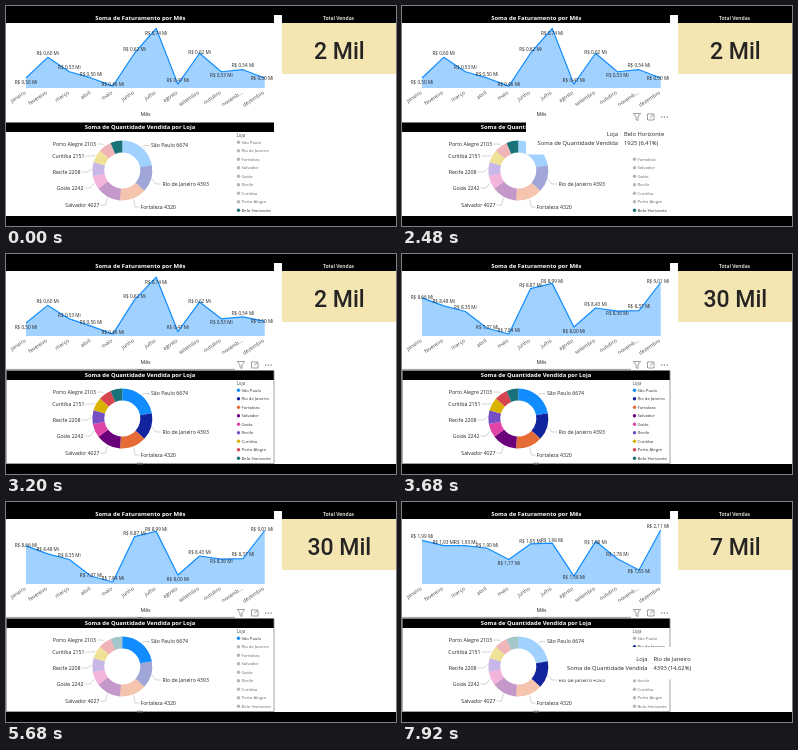
An HTML page with a canvas for the animation above (8000 ms loop, 390 px wide and 220 px high).

```html
<!DOCTYPE html>
<html lang="pt-BR">
<head>
<meta charset="utf-8">
<title>Painel de vendas</title>
<style>
  html, body { margin: 0; width: 100%; height: 100%; overflow: hidden; background: #000; }
  canvas { display: block; width: 390px; height: 220px; }
</style>
</head>
<body>
<canvas id="stage"></canvas>
<script>
const LOOP = 8000;
const canvas = document.getElementById('stage');
const ctx = canvas.getContext('2d');
const ratio = window.devicePixelRatio || 1;
canvas.width = 390 * ratio;
canvas.height = 220 * ratio;

const SANS = '"Open Sans", "Noto Sans", sans-serif';
const months = ['janeiro', 'fevereiro', 'março', 'abril', 'maio', 'junho', 'julho',
  'agosto', 'setembro', 'outubro', 'novemb...', 'dezembro'];

// Each series scales its values from its maximum; shift places the labels.
const series = [
  { total: '2 Mil', top: 22.5, scale: 206,
    values: [.50, .60, .53, .50, .46, .62, .74, .47, .62, .53, .54, .50],
    shift: [4, -4, -4, -4, -2, -4, 5, -4, -1, 4, -4, 0] },
  { total: '30 Mil', top: 28.5, scale: 44,
    values: [8.66, 8.48, 8.35, 7.97, 7.84, 8.87, 8.99, 8.00, 8.43, 8.36, 8.37, 9.01],
    shift: [-1, -4, -4, -1, -4, -3, -2, 4, -4, 2, -4, -1] },
  { total: '7 Mil', top: 28, scale: 87,
    values: [1.99, 1.93, 1.93, 1.90, 1.77, 1.95, 1.96, 1.58, 1.98, 1.78, 1.65, 2.11],
    shift: [-4, -3, -3, -3, 4, -3, -3, 1, 1, -4, 1, -4] }
];
for (const s of series) {
  const max = Math.max(...s.values);
  s.ys = s.values.map(v => s.top + (max - v) * s.scale);
}

// name, quantity, colour, label x, label y
const stores = [
  ['São Paulo', 6674, '#118dff', 145, 139.5],
  ['Rio de Janeiro', 4393, '#12239e', 156.5, 178],
  ['Fortaleza', 4320, '#e66c37', 134.5, 201],
  ['Salvador', 4027, '#6b007b', 93.5, 199],
  ['Goiás', 2242, '#e044a7', 77.5, 182],
  ['Recife', 2208, '#744ec2', 74.5, 166],
  ['Curitiba', 2151, '#d9b300', 78.5, 150],
  ['Porto Alegre', 2103, '#d64550', 90, 138],
  ['Belo Horizonte', 1925, '#197278']
];
const quantity = stores.reduce((sum, s) => sum + s[1], 0);

function box(x, y, w, h, color) {
  ctx.fillStyle = color;
  ctx.fillRect(x, y, w, h);
}

function text(str, x, y, size, { color = '#252423', align = 'left', weight = 400, font = SANS } = {}) {
  ctx.font = `${weight} ${size}px ${font}`;
  ctx.textAlign = align;
  ctx.fillStyle = color;
  ctx.fillText(str, x, y + size * 0.35);
}

function stroke(points, color, width) {
  ctx.beginPath();
  points.forEach(([x, y]) => ctx.lineTo(x, y));
  ctx.strokeStyle = color;
  ctx.lineWidth = width;
  ctx.stroke();
}

function morph(t, start, end) {
  const p = Math.min(1, Math.max(0, (t - start) / (end - start)));
  return p * p * (3 - 2 * p);
}

function areaChart(from, to, p) {
  const points = from.ys.map((y, i) => [20 + i * 21.7, y + (to.ys[i] - y) * p]);
  const shown = p < 0.5 ? from : to;
  ctx.beginPath();
  ctx.moveTo(20, 82);
  points.forEach(([x, y]) => ctx.lineTo(x, y));
  ctx.lineTo(points[11][0], 82);
  ctx.fillStyle = '#a0d1ff';
  ctx.fill();
  stroke(points, '#118dff', 1.2);
  points.forEach(([x, y], i) => {
    const value = shown.values[i].toFixed(2).replace('.', ',');
    text(`R$ ${value} Mi`, Math.min(x, 256), y + shown.shift[i], 4.7, { align: 'center' });
    ctx.save();
    ctx.translate(x - 1, 86);
    ctx.rotate(-0.58);
    text(months[i], 0, 0, 5.2, { align: 'right', color: '#484644' });
    ctx.restore();
  });
  text('Mês', 139.5, 108.5, 5.2, { align: 'center' });
}

function donut(selected) {
  const cx = 116.3, cy = 164.5, outer = 30, inner = 18;
  let angle = -Math.PI / 2;
  stores.forEach(([name, count, color, x, y], i) => {
    const end = angle + count / quantity * 2 * Math.PI;
    const mid = (angle + end) / 2;
    ctx.globalAlpha = selected < 0 || selected === i ? 1 : 0.4;
    ctx.beginPath();
    ctx.arc(cx, cy, outer, angle, end);
    ctx.arc(cx, cy, inner, end, angle, true);
    ctx.fillStyle = color;
    ctx.fill();
    ctx.globalAlpha = 1;
    angle = end;
    if (!x) return;
    const right = x > cx;
    stroke([
      [cx + (outer + 1) * Math.cos(mid), cy + (outer + 1) * Math.sin(mid)],
      [cx + (outer + 5) * Math.cos(mid), y],
      [x + (right ? -1 : 1), y]
    ], '#a6a6a6', 0.5);
    text(`${name} ${count}`, x, y, 5.2, { align: right ? 'left' : 'right' });
  });
}

function legend(selected) {
  text('Loja', 230.5, 129, 4.5, { color: '#484644' });
  stores.forEach(([name, , color], i) => {
    const y = 136.2 + i * 8.5;
    const active = selected < 0 || selected === i;
    ctx.beginPath();
    ctx.arc(232.5, y, 1.7, 0, 2 * Math.PI);
    ctx.fillStyle = active ? color : '#b5b5b8';
    ctx.fill();
    text(name, 235.5, y, 4.25, { color: active ? '#323130' : '#6c6a68' });
  });
}

function tooltip(x, y, index) {
  const [name, count] = stores[index];
  const share = (count / quantity * 100).toFixed(2).replace('.', ',');
  box(x, y, 150, 32.5, '#fff');
  text('Loja', x + 92, y + 12, 5.8, { align: 'right' });
  text(name, x + 98, y + 12, 5.8);
  text('Soma de Quantidade Vendida', x + 92, y + 20.5, 5.8, { align: 'right' });
  text(`${count} (${share}%)`, x + 98, y + 20.5, 5.8);
}

function headerIcons() {
  const gray = '#777';
  stroke([[231.5, 107.5], [238.5, 107.5], [236, 111], [236, 114.5], [234, 113.5], [234, 111], [231.5, 107.5]], gray, 0.7);
  ctx.strokeRect(245.5, 108, 6.5, 6);
  stroke([[248, 111.5], [251, 109]], gray, 0.7);
  for (let i = 0; i < 3; i++) box(259 + i * 2.8, 110.5, 1.2, 1.2, gray);
}

function selectionFrame() {
  const gray = '#8a8886';
  stroke([[229, 115.4], [0.4, 115.4], [0.4, 209.5], [268, 209.5], [268, 117]], gray, 0.8);
  for (const y of [115, 208.7]) box(131, y, 6, 1.6, gray);
}

function draw(t) {
  const selected = t < 2720 ? 8 : t < 5600 ? -1 : t < 7760 ? 0 : 1;
  const title = { color: '#fff', weight: 700, align: 'center' };
  ctx.setTransform(ratio, 0, 0, ratio, 0, 0);
  ctx.lineJoin = 'round';
  box(0, 0, 390, 220, '#000');
  box(0, 9, 390, 201, '#fff');
  box(0, 9, 268, 8, '#000');
  box(276, 9, 114, 8, '#000');
  box(0, 116.5, 268, 9.5, '#000');
  box(276, 17, 114, 51, '#f3e6b3');

  text('Soma de Faturamento por Mês', 134.3, 12.3, 5.9, title);
  text('Soma de Quantidade Vendida por Loja', 134, 121, 5.8, title);
  text('Total Vendas', 332.5, 12.3, 5.1, { ...title, weight: 600 });

  if (t < 5600) areaChart(series[0], series[1], morph(t, 3120, 3520));
  else areaChart(series[1], series[2], morph(t, 5680, 6000));
  const total = series[t < 3280 ? 0 : t < 5760 ? 1 : 2].total;
  text(total, 333.3, 44.5, 23, { align: 'center', weight: 500, font: 'Roboto, sans-serif' });

  donut(selected);
  legend(selected);
  if (t >= 2720) selectionFrame();
  if (t >= 960) headerIcons();
  if (t >= 1840 && t < 3200) tooltip(124, 116, 8);
  if (t >= 6880) tooltip(153.5, 145, 1);
}

const start = performance.now();
function tick() {
  draw((performance.now() - start) % LOOP);
  requestAnimationFrame(tick);
}
tick();
</script>
</body>
</html>
```
